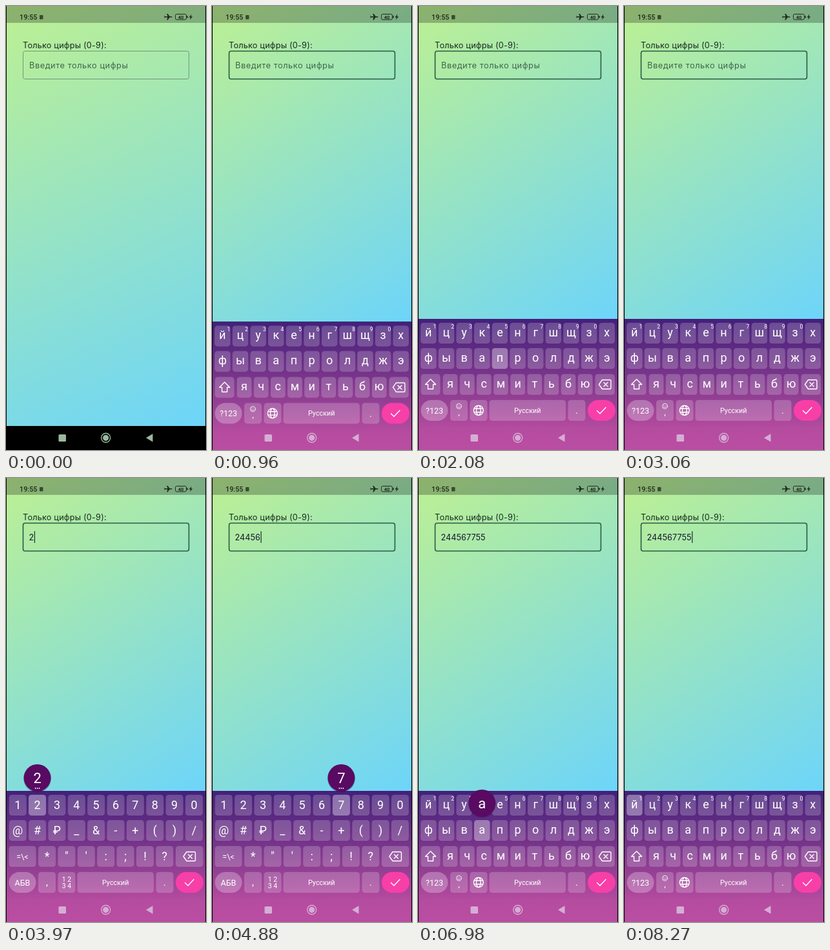
Write an HTML page that moves like this. It is 310 by 684 pixels and loops after 8.53 s.

```html
<!DOCTYPE html>
<html lang="ru">
<head>
<meta charset="utf-8">
<style>
html, body { margin: 0; width: 100%; height: 100%; overflow: hidden; background: #000; }
svg { display: block; width: 100%; height: 100%; }
.ui { font-family: Inter, "Open Sans", sans-serif; }
.kb { font-family: Roboto, "Noto Sans", sans-serif; fill: #fff; text-anchor: middle; }
.line { fill: none; stroke: #fff; stroke-width: 1.4; stroke-linejoin: round; stroke-linecap: round; }
</style>
</head>
<body>
<svg viewBox="0 0 310 684">
  <defs>
    <linearGradient id="sky" gradientUnits="userSpaceOnUse" x1="0" y1="0" x2="309" y2="647">
      <stop offset="0" stop-color="#bdf092"/><stop offset="1" stop-color="#6dd5fa"/>
    </linearGradient>
    <linearGradient id="dusk" x2="0" y2="1">
      <stop offset="0" stop-color="#43207a"/><stop offset=".32" stop-color="#6a2f86"/>
      <stop offset=".6" stop-color="#923f93"/><stop offset=".85" stop-color="#b64ca0"/>
      <stop offset="1" stop-color="#b94ea2"/>
    </linearGradient>
    <clipPath id="stage"><rect x="1" width="308" height="684"/></clipPath>
  </defs>
  <rect width="310" height="684"/>
  <g clip-path="url(#stage)">
    <rect id="page" width="310" height="647" fill="url(#sky)"/>
    <rect width="310" height="26" fill="#000" opacity=".26"/>
    <g fill="#1f2a1c">
      <text x="21" y="21" font-family="Roboto, sans-serif" font-size="10.8" font-weight="500">19:55</text>
      <rect x="52" y="14" width="5.5" height="6.5" rx="1" opacity=".75"/>
      <path d="M246.5 16h4l-1.3-4h1.5l3 4h3.3q1 .8 0 1.6h-3.3l-3 4h-1.5l1.3-4h-4l-1 1.5v-4.6z"/>
      <rect x="262.5" y="12.5" width="17" height="8.5" rx="2.2" fill="none" stroke="#1f2a1c"/>
      <rect x="280.4" y="15" width="1.4" height="3.6"/>
      <text x="271" y="19.5" font-family="Roboto, sans-serif" font-size="7.5" font-weight="700" text-anchor="middle">40</text>
      <path d="M287.6 12.5l-4 5h2.4l-1 3.7 4.2-5h-2.5z"/>
    </g>
    <text class="ui" x="26" y="64.5" font-size="12.7" letter-spacing=".2" fill="#17291f">Только цифры (0-9):</text>
    <rect id="field" x="26.5" y="69.5" width="257" height="43" rx="3" fill="none"/>
    <text id="hint" class="ui" x="36" y="96" font-size="12.8" letter-spacing=".55" fill="#1c3a2c" opacity=".75">Введите только цифры</text>
    <text id="value" class="ui" x="35.5" y="96" font-size="12.6" letter-spacing=".08" fill="#15152c"></text>
    <rect id="caret" y="82" width="1.3" height="18" fill="#1f3f33"/>
    <g id="keyboard">
      <rect y="482" width="310" height="202" fill="url(#dusk)"/>
      <g id="letters"></g>
      <g id="symbols"></g>
      <g id="shared"></g>
      <rect id="glow" height="32" rx="4.5" fill="#fff" opacity=".22"/>
      <g id="bubble">
        <circle cy="1" r="21.5" fill="#2a0838" opacity=".25"/>
        <circle r="21" fill="#590a62"/>
        <text class="kb" id="bubbleText" y="8" font-size="22"></text>
        <g id="dots" fill="#fff"><circle cx="-3" cy="16" r=".9"/><circle cy="16" r=".9"/><circle cx="3" cy="16" r=".9"/></g>
      </g>
    </g>
    <g id="nav">
      <rect x="81.5" y="660" width="11.5" height="11" rx="1.5"/>
      <circle cx="154.7" cy="665.3" r="7" fill="none" stroke-width="1.4"/>
      <circle cx="154.7" cy="665.3" r="4.6"/>
      <path d="M217 665.3l10.5-6.3v12.6z"/>
    </g>
  </g>
</svg>
<script>
const LOOP = 8530, KEYBOARD_START = 660, KEYBOARD_TIME = 360, FOCUS = 540;
const SYMBOLS_ON = 3400, SYMBOLS_OFF = 5790, TYPE_DELAY = 95;
const ROWS = [488, 527, 567, 607];
const $ = id => document.getElementById(id);
const keys = {};

function add(parent, tag, attrs, text) {
  const el = document.createElementNS('http://www.w3.org/2000/svg', tag);
  for (const name in attrs) el.setAttribute(name, attrs[name]);
  if (text) el.textContent = text;
  parent.appendChild(el);
  return el;
}

function label(parent, x, y, size, text) {
  add(parent, 'text', { class: 'kb', x, y, 'font-size': size }, text);
}

function key(parent, row, x, w, text = '', size = 18, style = {}) {
  const y = ROWS[row];
  add(parent, 'rect', { x, y, width: w, height: 32, rx: 4.5, fill: '#fff', 'fill-opacity': .2, ...style });
  const drop = size > 15 ? (/[а-я]/.test(text) ? 5 : 6.3) : size * .36;
  if (text) label(parent, x + w / 2, y + 16 + drop, size, text);
  keys[text] = { x, y, w, row };
}

function keyRow(parent, row, chars, first, pitch, w) {
  [...chars].forEach((c, i) => key(parent, row, first + i * pitch - w / 2, w, c));
}

function icon(parent, x, y, d) {
  add(parent, 'path', { class: 'line', d, transform: `translate(${x} ${y})` });
}

const BACKSPACE = 'M-9 0l5-7h12q1.5 0 1.5 1.5v11q0 1.5-1.5 1.5h-12zM-1.5-3l6 6m0-6l-6 6';
const pill = { rx: 16, 'fill-opacity': .27 };
const { letters, symbols, shared } = Object.fromEntries(['letters', 'symbols', 'shared'].map(id => [id, $(id)]));

keyRow(letters, 0, 'йцукенгшщз' + 'х', 16.3, 27.65, 24.5);
[...'1234567890'].forEach((d, i) => label(letters, 26 + i * 27.65, 496.5, 8.5, d));
keyRow(letters, 1, 'фывапролджэ', 16.3, 27.65, 24.5);
key(letters, 2, 4.5, 30);
icon(letters, 19.5, 583, 'M0-8l8 8h-4v7h-8v-7h-4z');
keyRow(letters, 2, 'ячсмитьбю', 50, 26.15, 22.8);
key(letters, 2, 274.5, 30.5);
icon(letters, 289.5, 583, BACKSPACE);
key(letters, 3, 4.5, 42, '?123', 12.5, pill);
key(letters, 3, 50, 27);
add(letters, 'circle', { class: 'line', cx: 63.5, cy: 616.5, r: 4, style: 'stroke-width:.9' });
add(letters, 'path', { class: 'line', d: 'M61.5 617.5q2 2.4 4 0M62 615.2v.1M65 615.2v.1', style: 'stroke-width:.9' });
label(letters, 63.5, 630, 13, ',');
key(letters, 3, 80.5, 27);
icon(letters, 93.8, 623, 'M-7.5 0a7.5 7.5 0 1 0 15 0a7.5 7.5 0 1 0-15 0M-3.3 0a3.3 7.5 0 1 0 6.6 0a3.3 7.5 0 1 0-6.6 0M-6.8-2.7h13.6M-6.8 2.7h13.6');

keyRow(symbols, 0, '1234567890', 18.2, 30.37, 27);
keyRow(symbols, 1, '@#₽_&-+()/', 18.2, 30.37, 27);
key(symbols, 2, 4.5, 42, '=\\<', 12.5);
keyRow(symbols, 2, '*"\':;!?', 63.6, 30.37, 27);
key(symbols, 2, 263, 42.5);
icon(symbols, 284, 583, BACKSPACE);
key(symbols, 3, 4.5, 42, 'АБВ', 12.5, pill);
key(symbols, 3, 50, 27, ',', 15);
key(symbols, 3, 80.5, 27);
label(symbols, 94, 621.5, 10.5, '1 2');
label(symbols, 94, 632, 10.5, '3 4');

key(shared, 3, 110.5, 118.5, 'Русский', 10.8);
key(shared, 3, 232.5, 27, '.', 15);
key(shared, 3, 263, 43, '', 0, { rx: 16, fill: '#f73fa8', 'fill-opacity': 1 });
icon(shared, 284.5, 623, 'M-7 .5l4.5 4.5 9-9.5');

// [time pressed, key]
const presses = [
  [1360, 'а'], [1640, 'к'], [1920, 'п'], [2200, 'о'], [2480, 'л'], [2760, 'м'],
  [3270, '?123'],
  [3870, '2'], [4080, '4'], [4260, '4'], [4450, '5'], [4645, '6'],
  [4855, '7'], [4995, '7'], [5135, '5'], [5275, '5'],
  [5650, 'АБВ'],
  [6150, 'п'], [6400, 'н'], [6650, 'в'], [6900, 'а'], [7150, 'ц'], [7400, 'й']
];
const digits = presses.filter(p => /^\d$/.test(p[1]));

function set(id, attrs) {
  for (const name in attrs) $(id).setAttribute(name, attrs[name]);
}
function show(id, on) {
  $(id).style.display = on ? '' : 'none';
}

function caretVisible(t, lastTyped) {
  if (t < FOCUS) return false;
  if (t < digits[0][0]) return Math.floor((t + 300) / 500) % 2 === 1 || t < 700;
  if (t < lastTyped + 500) return true;
  return Math.floor((t - 5078) / 532) % 2 === 0;
}

function draw(t) {
  const open = t >= KEYBOARD_START;
  const rise = Math.min(1, Math.max(0, (t - KEYBOARD_START) / KEYBOARD_TIME));
  const offset = 165 * (1 - rise) ** 2;
  const bottom = 482 + offset;
  set('page', { height: bottom });
  set('sky', { y2: bottom });
  set('keyboard', { transform: `translate(0 ${offset})` });
  show('keyboard', open);
  const navColor = open ? '#d5add5' : '#9ab99e';
  set('nav', { fill: navColor, stroke: navColor, 'stroke-width': 0 });

  const focused = t >= FOCUS;
  set('field', { stroke: focused ? '#2b5a45' : '#71967a', 'stroke-width': focused ? 1.6 : 1 });

  const typed = digits.filter(p => t >= p[0] + TYPE_DELAY);
  $('value').textContent = typed.map(p => p[1]).join('');
  show('hint', !typed.length);
  const lastTyped = typed.length ? typed[typed.length - 1][0] + TYPE_DELAY : 0;
  set('caret', { x: typed.length ? 36 + $('value').getComputedTextLength() : 35.8 });
  show('caret', caretVisible(t, lastTyped));

  const symbolic = t >= SYMBOLS_ON && t < SYMBOLS_OFF;
  show('letters', !symbolic);
  show('symbols', symbolic);

  const last = presses[presses.length - 1];
  const press = presses.find(p => t >= p[0] && (p === last || t < p[0] + (p[1].length > 1 ? 120 : 175)));
  const k = press && keys[press[1]];
  const bubble = k && press[1].length === 1 && t < press[0] + 125;
  show('glow', k);
  show('bubble', bubble);
  if (k) set('glow', { x: k.x, y: k.y, width: k.w, rx: k.w === 42 ? 16 : 4.5 });
  if (bubble) {
    const x = Math.min(287, Math.max(23, k.x + k.w / 2));
    set('bubble', { transform: `translate(${x} ${k.y - 26})` });
    $('bubbleText').textContent = press[1];
    show('dots', k.row === 0);
  }
}

const start = performance.now();
function tick() {
  draw((performance.now() - start) % LOOP);
  requestAnimationFrame(tick);
}
tick();
</script>
</body>
</html>
```
